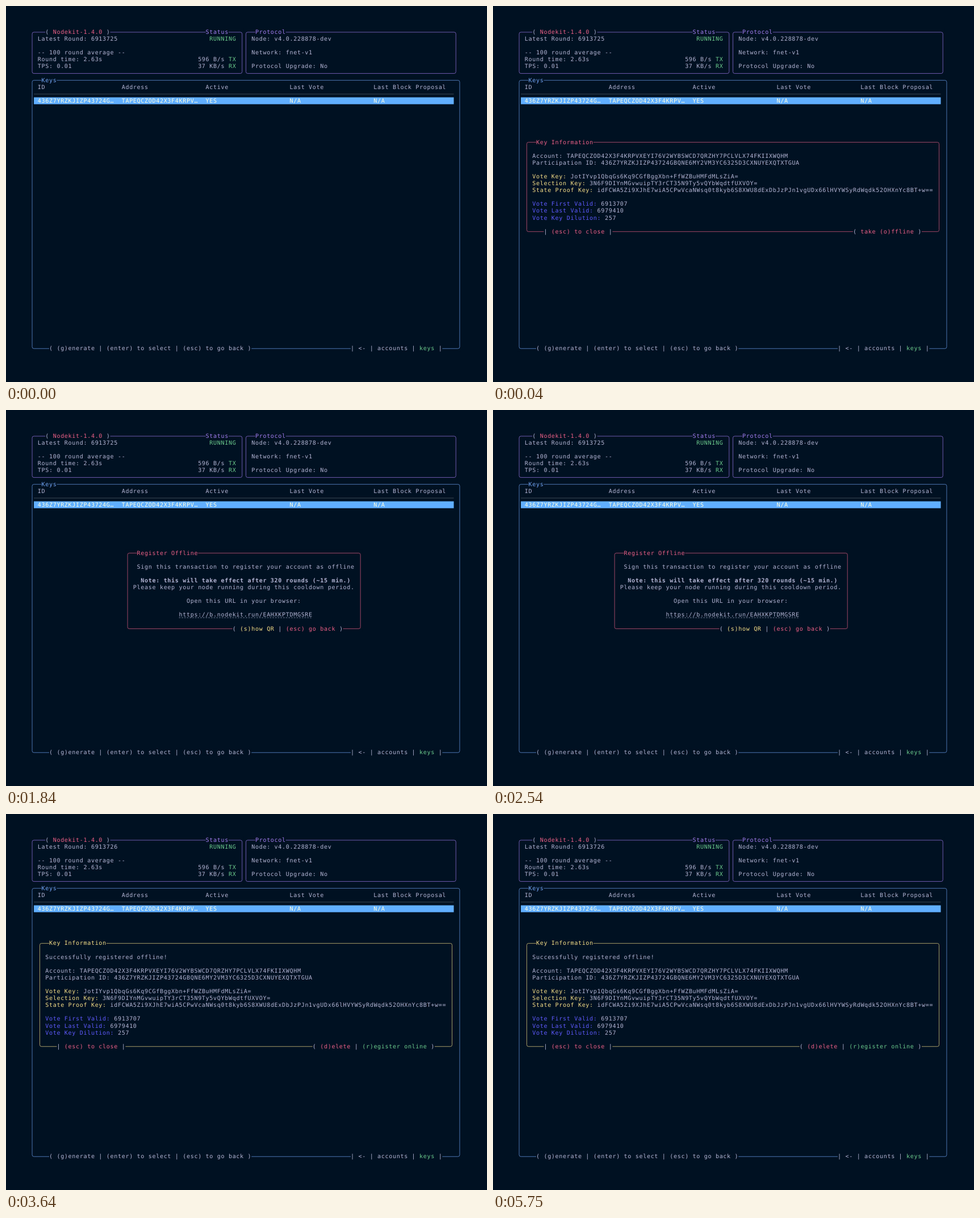
Write an HTML page that moves like this. It is 847 px wide and 661 px high and loops after 7.16 s.

```html
<!DOCTYPE html>
<html lang="en">
<head>
<meta charset="utf-8">
<title>Terminal node manager</title>
<style>
  html, body { margin: 0; width: 100%; height: 100%; overflow: hidden; background: #001122; }
  svg { display: block; width: 100%; height: 100%; }
  text {
    font: 15px "DejaVu Sans Mono", monospace;
    letter-spacing: .97px;
    white-space: pre;
    text-rendering: geometricPrecision;
  }
  .bold { font-weight: bold; }
</style>
</head>
<body>
<svg id="screen" viewBox="0 0 1260 984" preserveAspectRatio="none"></svg>
<script>
const LOOP = 7160;
const BG = "#001122", FG = "#b4b5d4", RED = "#ee6087", GREEN = "#6ccc8e", YELLOW = "#f8df88",
      PURPLE = "#a47ef0", BLUE = "#74a6f6", INDIGO = "#5f5bff", SELECT = "#61afff", CREAM = "#ffffdf";

const screen = document.getElementById("screen");
let layer = screen;

// Terminal grid: 10 x 18 unit cells
const cellX = col => 63 + col * 10;
const cellY = row => 59 + row * 18;

function add(tag, attrs, parent = layer) {
  const el = document.createElementNS("http://www.w3.org/2000/svg", tag);
  for (const name in attrs) el.setAttribute(name, attrs[name]);
  return parent.appendChild(el);
}

function fill(row, col, rows, cols, color) {
  add("rect", { x: cellX(col), y: cellY(row), width: cols * 10, height: rows * 18, fill: color });
}

// Each part is a string in the default colour or a [string, colour] pair.
function write(row, col, ...parts) {
  const line = add("text", { x: cellX(col), y: cellY(row) + 14, fill: FG });
  for (const part of parts) {
    const [str, color] = [].concat(part);
    add("tspan", color ? { fill: color } : {}, line).textContent = str;
  }
  return line;
}

// Text that interrupts a border
function label(row, col, ...parts) {
  const length = parts.reduce((sum, part) => sum + [].concat(part)[0].length, 0);
  fill(row, col, 1, length, BG);
  write(row, col, ...parts);
}

function box(top, left, bottom, right, color) {
  fill(top, left, bottom - top + 1, right - left + 1, BG);
  add("rect", {
    x: cellX(left) + 5.5, y: cellY(top) + 9.5, width: (right - left) * 10, height: (bottom - top) * 18,
    rx: 4.5, fill: "none", stroke: color
  });
}

function rule(y, from, to, color, extra) {
  add("line", { x1: cellX(from), x2: cellX(to), y1: y, y2: y, stroke: color, ...extra });
}

function group(draw) {
  const parent = layer;
  layer = add("g", {}, screen);
  const made = layer;
  draw();
  layer = parent;
  return made;
}

let round;
function drawBase() {
  box(0, 0, 6, 55, PURPLE);
  label(0, 4, "( ", ["Nodekit-1.4.0", RED], " )");
  label(0, 46, ["Status", PURPLE]);
  round = write(1, 2, "Latest Round: ", "6913725").lastChild;
  write(1, 47, ["RUNNING", GREEN]);
  write(3, 2, "-- 100 round average --");
  write(4, 2, "Round time: 2.63s");
  write(4, 44, "596 B/s ", ["TX", GREEN]);
  write(5, 2, "TPS: 0.01");
  write(5, 44, "37 KB/s ", ["RX", GREEN]);

  box(0, 56, 6, 111, PURPLE);
  label(0, 59, ["Protocol", PURPLE]);
  write(1, 58, "Node: v4.0.228878-dev");
  write(3, 58, "Network: fnet-v1");
  write(5, 58, "Protocol Upgrade: No");

  box(7, 0, 46, 112, BLUE);
  label(7, 3, ["Keys", BLUE]);
  label(46, 5, "( (g)enerate | (enter) to select | (esc) to go back )");
  label(46, 84, "| <- | accounts | ", ["keys", GREEN], " |");

  rule(cellY(9) + 9.5, 1, 111, "#5f646c");
  fill(10, 1, 1, 110, SELECT);
  const heads = ["ID", "Address", "Active", "Last Vote", "Last Block Proposal"];
  const cells = ["436Z7YRZKJIZP43724G…", "TAPEQCZOD42X3F4KRPV…", "YES", "N/A", "N/A"];
  heads.forEach((head, i) => {
    write(8, 2 + i * 22, head);
    write(10, 2 + i * 22, [cells[i], CREAM]);
  });
}

function drawKeyInfo(top, color, message, actions, actionsCol) {
  const bottom = top + (message ? 15 : 13);
  box(top, 2, bottom, 110, color);
  label(top, 5, ["Key Information", color]);
  if (message) write(top + 2, 4, message);

  const row = bottom - 11;
  write(row, 4, "Account: TAPEQCZOD42X3F4KRPVXEYI76V2WYBSWCD7QRZHY7PCLVLX74FKIIXWQHM");
  write(row + 1, 4, "Participation ID: 436Z7YRZKJIZP43724GBQNE6MY2VM3YC6325D3CXNUYEXQTXTGUA");
  write(row + 3, 4, ["Vote Key: ", YELLOW], "JotIYvp1QbqGs6Kq9CGfBggXbn+FfWZBuHMFdMLsZiA=");
  write(row + 4, 4, ["Selection Key: ", YELLOW], "3N6F9DIYnMGvwuipTY3rCT35N9Ty5vQYbWqdtfUXVOY=");
  write(row + 5, 4, ["State Proof Key: ", YELLOW],
    "idFCWA5Zi9XJhE7wiA5CPwVcaNWsq0t8kyb6S8XWU8dExDbJzPJn1vgUDx66lHVYWSyRdWqdk52OHXnYc8BT+w==");
  write(row + 7, 4, ["Vote First Valid: ", INDIGO], "6913707");
  write(row + 8, 4, ["Vote Last Valid: ", INDIGO], "6979410");
  write(row + 9, 4, ["Vote Key Dilution: ", INDIGO], "257");

  label(bottom, 7, "| ", ["(esc) to close", RED], " |");
  label(bottom, actionsCol, "( ", ...actions, " )");
}

function drawRegister(top, left, bottom, right, noteRow, toggle, actionsCol) {
  box(top, left, bottom, right, RED);
  label(top, left + 3, ["Register Offline", RED]);
  write(top + 2, 28, "Sign this transaction to register your account as offline");
  write(noteRow, 29, "Note: this will take effect after 320 rounds (~15 min.)").classList.add("bold");
  write(noteRow + 1, 27, "Please keep your node running during this cooldown period.");
  label(bottom, actionsCol, "( ", [toggle, YELLOW], " | ", ["(esc) go back", RED], " )");
}

function drawLink() {
  drawRegister(17, 25, 28, 86, 21, "(s)how QR", 53);
  write(24, 41, "Open this URL in your browser:");
  write(26, 39, "https://b.nodekit.run/EAHXKPTDMGSRE");
  rule(cellY(26) + 16.5, 39, 74, FG, { "stroke-dasharray": "4 3" });
}

function drawScan() {
  drawRegister(8, 24, 37, 87, 13, "(s)how link", 52);
  write(11, 26, ["Scan the QR code with Bexu", GREEN], " or ", ["press S to show a link instead", YELLOW]);
  fill(15, 35.6, 21, 42.8, "#000");
}

group(drawBase);
const steps = [
  { at: 0 },
  { at: 40, view: group(() => drawKeyInfo(16, RED, "", [["take (o)ffline", RED]], 88)) },
  { at: 1840, view: group(drawLink) },
  { at: 3000, view: group(drawScan) },
  { at: 3640, round: "6913726", view: group(() => drawKeyInfo(15, YELLOW, "Successfully registered offline!",
      [["(d)elete", RED], " | ", ["(r)egister online", GREEN]], 74)) }
];

const start = performance.now();
let shown;
function tick() {
  const time = (performance.now() - start) % LOOP;
  const step = steps.findLast(s => s.at <= time);
  if (step !== shown) {
    shown = step;
    for (const s of steps) if (s.view) s.view.style.display = s === step ? "" : "none";
    round.textContent = step.round || "6913725";
  }
  requestAnimationFrame(tick);
}
tick();
</script>
</body>
</html>
```
